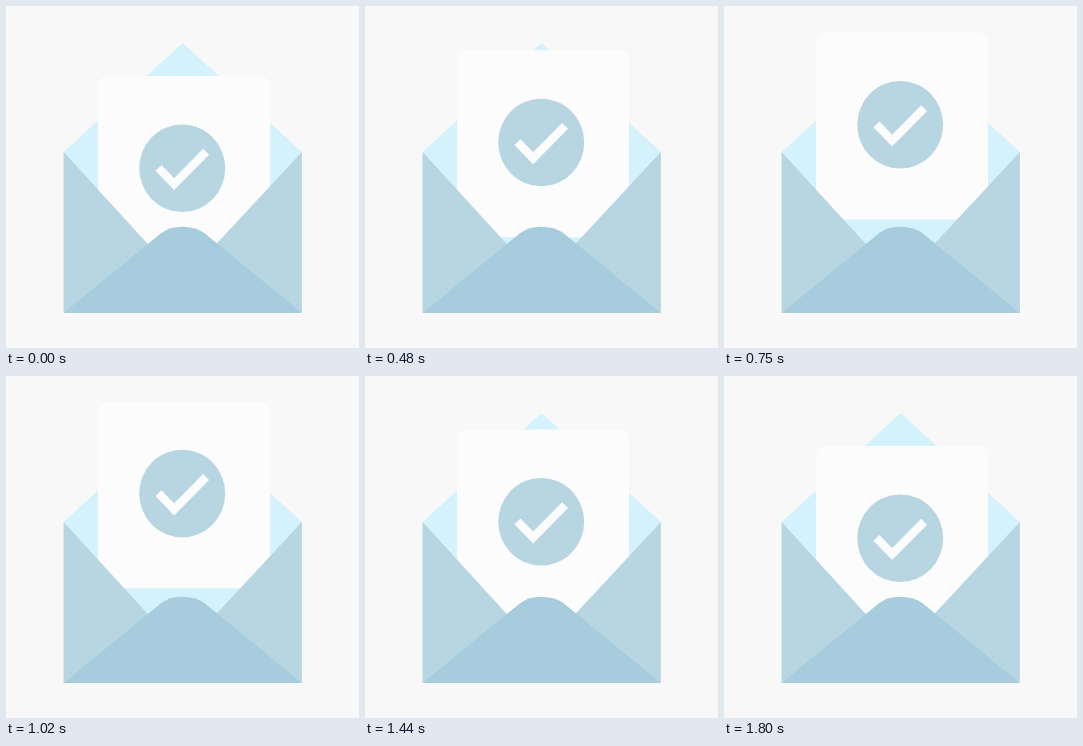
An HTML page with a canvas that plays this animation: 353x342 px, repeating every 1830 ms.

```html
<!DOCTYPE html>
<html lang="en">
<head>
<meta charset="utf-8">
<title>Open envelope</title>
<style>
  html, body { margin: 0; width: 100%; height: 100%; overflow: hidden; background: #f8f8f8; }
  canvas { display: block; }
</style>
</head>
<body>
<canvas id="stage" width="353" height="342"></canvas>
<script>
const ctx = document.getElementById('stage').getContext('2d');
const LOOP = 1830, STEP = 30, HALF = 900, LIFT = 47;
const BG = '#f8f8f8', PAPER = '#fcfcfc', INSIDE = '#d4f2fc', SIDE = '#b7d6e1', FRONT = '#a6ccde';

// Envelope: outer edges, centre, and the heights of its corners.
const LEFT = 57.6, RIGHT = 295.9, MID = 176.7;
const TIP = 37, SHOULDER = 146, BASE = 307;

function triangle(color, ax, ay, bx, by, cx, cy) {
  ctx.fillStyle = color;
  ctx.beginPath();
  ctx.moveTo(ax, ay);
  ctx.lineTo(bx, by);
  ctx.lineTo(cx, cy);
  ctx.fill();
}

// Rise and fall, each half eased in and out.
function lift(t) {
  const p = Math.max(0, 1 - Math.abs(t - HALF) / HALF);
  return LIFT * p * p * (3 - 2 * p);
}

function back() {
  triangle(INSIDE, MID, TIP, RIGHT, SHOULDER, LEFT, SHOULDER);
  ctx.fillRect(LEFT, SHOULDER, RIGHT - LEFT, BASE - SHOULDER);
}

function card() {
  ctx.fillStyle = PAPER;
  ctx.beginPath();
  ctx.roundRect(92, 70, 172, 187, 9);
  ctx.fill();

  ctx.fillStyle = SIDE;
  ctx.beginPath();
  ctx.ellipse(176.2, 162.3, 43, 43.8, 0, 0, Math.PI * 2);
  ctx.fill();

  ctx.strokeStyle = PAPER;
  ctx.lineWidth = 8.4;
  ctx.beginPath();
  ctx.moveTo(152.5, 161.9);
  ctx.lineTo(168.1, 178.1);
  ctx.lineTo(200.1, 145.7);
  ctx.stroke();
}

function front() {
  triangle(SIDE, LEFT, SHOULDER, 145, 241.5, LEFT, BASE);
  triangle(SIDE, RIGHT, SHOULDER, 207, 241.5, RIGHT, BASE);
  ctx.fillStyle = FRONT;
  ctx.beginPath();
  ctx.moveTo(LEFT, BASE);
  ctx.lineTo(155, 227.2);
  ctx.quadraticCurveTo(164, 220.8, 176, 220.8);
  ctx.quadraticCurveTo(189, 220.8, 198, 226.8);
  ctx.lineTo(RIGHT, BASE);
  ctx.fill();
}

function draw(now) {
  const t = Math.floor((now % LOOP) / STEP) * STEP;
  ctx.fillStyle = BG;
  ctx.fillRect(0, 0, 353, 342);
  back();
  ctx.save();
  ctx.translate(0, -lift(t));
  card();
  ctx.restore();
  front();
}

const start = performance.now();
function tick() {
  draw(performance.now() - start);
  requestAnimationFrame(tick);
}
tick();
</script>
</body>
</html>
```
